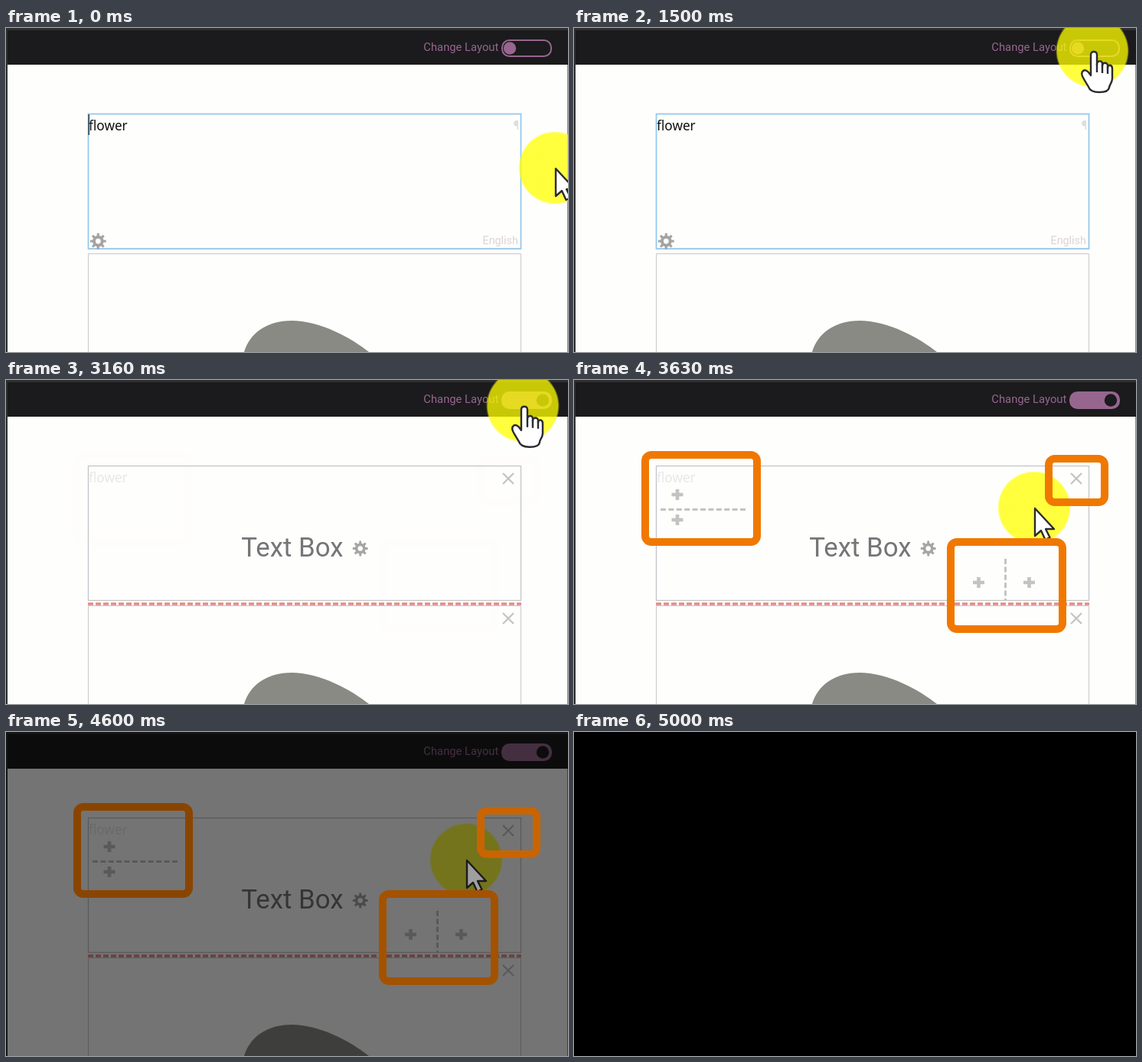
These frames come from a looping animation (734x424 px, 5500 ms). An HTML page:

```html
<!DOCTYPE html>
<html lang="en">
<head>
<meta charset="utf-8">
<title>Change Layout</title>
<style>
  html, body { margin: 0; width: 100%; height: 100%; overflow: hidden; background: #000; }
  svg { display: block; width: 734px; height: 424px; }
  text { font-family: Roboto, sans-serif; }
  .plain { fill: none; }
</style>
</head>
<body>
<svg viewBox="0 0 734 424">
  <defs>
    <radialGradient id="glow">
      <stop offset=".95" stop-color="#ff0" stop-opacity=".76"/>
      <stop offset="1" stop-color="#ff0" stop-opacity="0"/>
    </radialGradient>
    <path id="gear" fill-rule="evenodd"/>
    <path id="cross" d="M-7 -7L7 7M7 -7L-7 7" stroke="#c3c3c3" stroke-width="2.2"/>
    <path id="plus" d="M-7.5 0H7.5M0 -7V7" stroke="#c3c3c3" stroke-width="4.6"/>
  </defs>

  <g id="scene">
    <rect width="734" height="424" fill="#2f2f2f"/>
    <rect x="2" y="48" width="731" height="376" fill="#fefefd"/>
    <rect x="733" y="48" width="1" height="376" fill="#8a8a8a"/>
    <rect x="2" y="3" width="732" height="45" fill="#1b1a1c"/>
    <text x="545.3" y="30" font-size="14.8" fill="#96668f">Change Layout</text>
    <rect id="track" x="648" y="16" width="64" height="21" rx="9.5" fill="#96668f" stroke="#96668f" stroke-width="2"/>
    <circle id="knob" cy="26.5" r="8.2"/>

    <path d="M311 424C318 400 340 383 373 383C410 383 450 405 474 424Z" fill="#888a83"/>
    <path class="plain" d="M107.5 424V295.5H672.5V424" stroke="#cbc7ca"/>
    <rect class="plain" x="107.5" y="112.5" width="565" height="176" stroke="#c2c6c8" stroke-width="1.3"/>
    <text id="word" x="108" y="134" font-size="17.2" style="font-family:'Noto Sans',sans-serif">flower</text>

    <g id="edit">
      <rect class="plain" x="107.5" y="112.5" width="565" height="176.5" stroke="#92c9f0" stroke-width="1.6"/>
      <use href="#gear" transform="translate(120.3 279)" fill="#a3a3a3"/>
      <text x="622.5" y="283" font-size="14.3" fill="#ddd3d3">English</text>
      <text x="662.5" y="132.5" font-size="16" fill="#dedede">¶</text>
      <rect id="caret" x="107.6" y="113" width="1.2" height="27" fill="#111"/>
    </g>

    <g id="layout">
      <text x="307.2" y="231" font-size="34.8" fill="#757578">Text Box</text>
      <use href="#gear" transform="translate(462.7 220.5) scale(.95)" fill="#a5a5a5"/>
      <use href="#cross" x="656" y="129"/>
      <use href="#cross" x="656" y="312"/>
      <path d="M107 293H673" stroke="#e28c88" stroke-width="3.4" stroke-dasharray="7 3"/>
    </g>

    <g id="splits">
      <path d="M113 169.5H224M563.5 234V289" stroke="#c3c3c3" stroke-width="3" stroke-dasharray="7 3.4"/>
      <use href="#plus" x="135" y="150"/>
      <use href="#plus" x="135" y="183"/>
      <use href="#plus" x="528.5" y="265"/>
      <use href="#plus" x="594.5" y="265"/>
    </g>
    <circle id="halo" r="48" fill="url(#glow)"/>
  </g>

  <g id="pointer" fill="#fff" stroke="#2b2b2f" stroke-width="2.4" stroke-linejoin="round">
    <path id="arrow" d="M1 1V37L9 30L14.5 42L20.5 39L15 28H26Z"/>
    <g id="hand">
      <path d="M-2 30V5Q-2 1 2 1Q6 1 6 5V18C6 12 13 12 13 17V20C13 14 20 15 20 19V22C20 17 26 18 26 23V36C26 42 22 44 22 48Q21 54 9 54Q-3 54 -5 47L-11 37Q-16 29 -12 26Q-9 24 -5 28L-2 32Z"/>
      <path class="plain" d="M6 17V28M13 19V29M20 21V30"/>
    </g>
  </g>

  <g class="plain" id="frames" stroke="#f07800" stroke-width="10">
    <rect x="93" y="98" width="146" height="114" rx="8"/>
    <rect x="492" y="212" width="146" height="114" rx="8"/>
    <rect x="620" y="103" width="73" height="57" rx="8"/>
  </g>
</svg>
<script>
const LOOP = 5500;
const $ = id => document.getElementById(id);
const clamp = v => Math.min(1, Math.max(0, v));
const ramp = (t, from, to) => clamp((t - from) / (to - from));
const smooth = p => p * p * (3 - 2 * p);
const mix = (a, b, p) => a + (b - a) * p;

function gearPath(teeth, tip, root, hole) {
  const pts = [];
  const step = 2 * Math.PI / teeth;
  for (let i = 0; i < teeth; i++) {
    for (const [off, r] of [[-.28, root], [-.18, tip], [.18, tip], [.28, root]]) {
      const a = (i + off) * step;
      pts.push((r * Math.sin(a)).toFixed(2) + ' ' + (-r * Math.cos(a)).toFixed(2));
    }
  }
  return `M${pts.join('L')}ZM${hole} 0A${hole} ${hole} 0 1 0 ${-hole} 0A${hole} ${hole} 0 1 0 ${hole} 0Z`;
}
$('gear').setAttribute('d', gearPath(8, 10.5, 7.4, 3.4));

// Callouts: [fade-in start, fade-in end, fade-out start, fade-out end]
const fades = [
  [3160, 3400, 4500, 4736],
  [3160, 3450, 4510, 4794],
  [3160, 3630, 4530, 4963]
];
const frames = [...$('frames').children];

function pointerAt(t) {
  if (t < 3160) {
    const p = smooth(Math.pow(ramp(t, 330, 1500), .9));
    return [mix(717, 677, Math.pow(p, 1.5)), mix(183, 30, p)];
  }
  const p = smooth(ramp(t, 3110, 3630));
  return [mix(677, 601, p), mix(30, 167, p)];
}

function dim(el, t, from, to) {
  const b = t < 4530 ? 1 : 1 - ramp(t, from, to);
  el.style.filter = b < 1 ? `brightness(${b})` : 'none';
}

function draw(t) {
  const [x, y] = pointerAt(t);
  const place = `translate(${x.toFixed(2)} ${y.toFixed(2)})`;
  $('halo').setAttribute('transform', place);
  $('pointer').setAttribute('transform', place);
  const onSwitch = y < 40;
  $('hand').style.display = onSwitch ? '' : 'none';
  $('arrow').style.display = onSwitch ? 'none' : '';

  const slide = smooth(ramp(t, 2190, 2500));
  $('knob').setAttribute('cx', mix(658, 701, slide));
  $('knob').setAttribute('fill', `rgb(${mix(150, 27, slide)},${mix(102, 26, slide)},${mix(143, 28, slide)})`);
  $('track').setAttribute('fill-opacity', slide);

  const mode = smooth(ramp(t, 2200, 2730));
  const ink = mix(17, 231, mode);
  $('word').setAttribute('fill', `rgb(${ink},${ink},${ink})`);
  $('edit').style.opacity = 1 - mode;
  $('layout').style.opacity = mode;
  $('caret').style.opacity = Math.floor((t + 190) / 530) % 2 && t < 1930 ? 0 : 1;

  $('splits').style.opacity = ramp(t, 3160, 3450);
  frames.forEach((el, i) => {
    const [inA, inB, outA, outB] = fades[i];
    el.style.opacity = ramp(t, inA, inB);
    dim(el, t, outA, outB);
  });
  dim($('scene'), t, 4476, 4706);
  dim($('pointer'), t, 4472, 4815);
}

function tick() {
  draw(performance.now() % LOOP);
  requestAnimationFrame(tick);
}
tick();
</script>
</body>
</html>
```
